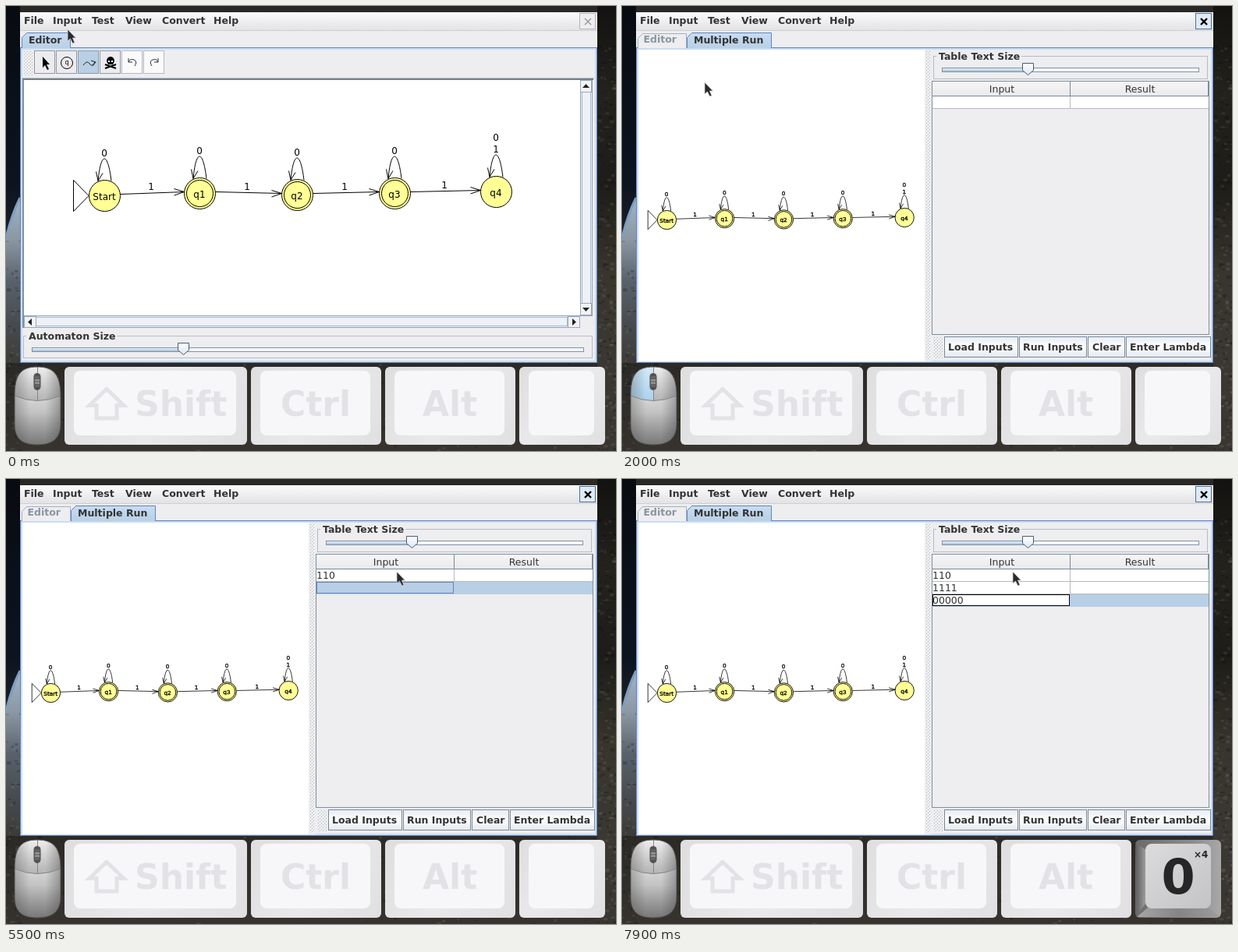
Animation of 782x571 px, one loop 8 s. Source, as an HTML page with a canvas:

```html
<!DOCTYPE html>
<html lang="en">
<head>
<meta charset="utf-8">
<title>Multiple run</title>
<style>
html, body { margin: 0; width: 782px; height: 571px; overflow: hidden; background: #26231f; }
canvas { display: block; }
</style>
</head>
<body>
<canvas id="stage" width="782" height="571"></canvas>
<script>
const g = document.getElementById('stage').getContext('2d');
const INK = '#333', PANEL = '#eeedef', EDGE = '#7a8a99', BLUE = '#b8cfe5', STEEL = '#6382bf';

// ---- timing: [ms, x, y] for the pointer, then what has been typed
const PATH = [[0, 79, 30], [100, 79, 30], [400, 77, 18], [1000, 77, 18], [1400, 105, 87], [1500, 105, 87],
  [1600, 106, 98], [2000, 106, 98], [2200, 480, 133], [2300, 480, 133], [2400, 482, 135],
  [2500, 482, 135], [2800, 512, 106], [3000, 501, 119]];
const PRESSES = [[400, 800], [1700, 2100], [3000, 3500]];
const DONE = ['110', '1111'];
// [ms, selected row, text in the cell, key shown, repeats]
const TYPING = [[0, -1, '', '', 0], [3500, 0, '', '', 0],
  [4100, 0, '1', '1', 1], [4200, 0, '11', '1', 2], [4700, 0, '110', '0', 1],
  [5200, 1, '', '⏎', 1], [5500, 1, '', '', 0],
  [5900, 1, '1', '1', 1], [6000, 1, '11', '1', 2], [6100, 1, '111', '1', 3], [6300, 1, '1111', '1', 4],
  [6600, 2, '', '⏎', 1], [6700, 2, '', '', 0],
  [7300, 2, '0', '0', 1], [7400, 2, '00', '0', 2], [7600, 2, '000', '0', 3],
  [7700, 2, '000', '0', 4], [7900, 2, '00000', '0', 4]];

function pointerAt(t) {
  const i = PATH.findIndex(p => p[0] > t);
  if (i < 0) return PATH.at(-1).slice(1);
  const [t0, x0, y0] = PATH[i - 1], [t1, x1, y1] = PATH[i], k = (t - t0) / (t1 - t0);
  return [Math.round(x0 + (x1 - x0) * k), Math.round(y0 + (y1 - y0) * k)];
}

// ---- drawing helpers
function rect(x, y, w, h, fill) { g.fillStyle = fill; g.fillRect(x, y, w, h); }
function frame(x, y, w, h, color = EDGE) {
  g.strokeStyle = color; g.lineWidth = 1;
  g.strokeRect(x + .5, y + .5, w - 1, h - 1);
}
function round(x, y, w, h, r, fill) {
  g.beginPath(); g.roundRect(x, y, w, h, r);
  g.fillStyle = fill; g.fill();
}
function fade(x0, y0, x1, y1, ...colors) {
  const f = g.createLinearGradient(x0, y0, x1, y1);
  colors.forEach((c, i) => f.addColorStop(i / (colors.length - 1), c));
  return f;
}
function font(size, bold) { g.font = `${bold ? 'bold ' : ''}${size}px "DejaVu Sans", sans-serif`; }
function text(s, x, y, { size = 12.5, color = INK, bold = false, align = 'left' } = {}) {
  font(size, bold);
  g.fillStyle = color; g.textAlign = align;
  g.fillText(s, x, y);
}
// bold text whose visible left edge sits at x
function label(s, x, y, color) {
  font(12.5, true); g.textAlign = 'left';
  text(s, x + Math.round(g.measureText(s).actualBoundingBoxLeft), y, { bold: true, color });
}
function shape(d, fill, stroke, width = 1) {
  const p = new Path2D(d);
  if (fill) { g.fillStyle = fill; g.fill(p); }
  if (stroke) { g.strokeStyle = stroke; g.lineWidth = width; g.stroke(p); }
}
function dots(x, y, w, h) {
  for (let r = 0; r < h; r += 2)
    for (let c = r % 4; c < w; c += 4) {
      rect(x + c, y + r, 1, 1, '#a3adb8');
      rect(x + c + 1, y + r + 1, 1, 1, '#fafafb');
    }
}

// ---- desktop, mouse and keys
function specks(n, x, y, w, h) {
  let seed = 7;
  const rnd = () => (seed = seed * 16807 % 2147483647) / 2147483647;
  for (let i = 0; i < n; i++)
    rect(x + rnd() * w, y + rnd() * h, 2 + rnd() * 4, 1 + rnd() * 3,
      rnd() < .5 ? 'rgba(0,0,0,.22)' : 'rgba(150,142,128,.16)');
}

function desktop() {
  rect(0, 0, 782, 571, fade(0, 458, 0, 571, '#2d2a26', '#37342f'));
  rect(18, 0, 740, 8, '#2a2826');
  rect(0, 0, 18, 571, fade(0, 0, 0, 571, '#080b10', '#0a1019', '#0c1420', '#2a2a29', '#2b2a27', '#35322d'));
  g.save();
  g.beginPath(); g.rect(0, 0, 18, 458); g.clip();
  shape('M18 246Q7 268 0 298V460H18Z', fade(0, 246, 0, 458, '#9fb4c8', '#8b98a4', '#59626c', '#484c50', '#3c3b38'));
  shape('M18 246Q7 268 0 298', null, '#7f9dc0', 3);
  g.restore();
  rect(758, 0, 24, 571, fade(0, 0, 0, 571, '#131210', '#24221d', '#1e1c18', '#38352d', '#3b3833', '#3a3732'));
  specks(220, 758, 50, 24, 521);
  specks(70, 0, 300, 18, 271);
  specks(160, 0, 458, 782, 113);
}

function mouse(pressed) {
  const body = 'M11 501C11 474 18 463 40 463S70 474 70 501V536C70 555 60 563 40 563S11 555 11 536Z';
  shape(body, fade(0, 500, 0, 563, '#d9d9d9', '#c3c3c3', '#9c9c9c', '#787878'));
  g.save(); g.clip(new Path2D(body));
  shape('M11 463H70V500Q40 513 11 500Z', fade(0, 463, 0, 508, '#eee', '#cfcfcf', '#b2b2b2'));
  if (pressed) shape('M11 463H40V507Q24 505 11 500Z', fade(0, 463, 0, 507, '#d3eafa', '#a9d2ee'));
  rect(11, 463, 59, 100, fade(11, 0, 70, 0, 'rgba(60,60,60,.3)', 'rgba(60,60,60,0)', 'rgba(60,60,60,0)', 'rgba(50,50,50,.35)'));
  shape('M11 500Q40 513 70 500M40.5 463V507', null, '#858585');
  g.restore();
  shape(body, null, '#4e4e4e');
  round(35.5, 471, 9, 22, 4.5, '#555');
  round(37, 473, 6, 18, 3, fade(0, 473, 0, 491, '#444', '#aaa', '#444'));
  shape('M37 478H43M37 482H43M37 486H43', null, '#444');
}

function paleKey(x, w, name, tx) {
  round(x, 463, w, 100, 6, fade(x, 463, x + w, 563, '#dededf', '#e9e8ea', '#e0dfe1'));
  round(x + 12, 468, w - 26, 83, 8, '#f7f6f9');
  text(name, tx, 526, { size: 44, bold: true, color: '#e3e2e6' });
}

function keys(key, count) {
  paleKey(75, 234, 'Shift', 165);
  shape('M129 491.5L151 512.5H142V529H116V512.5H107Z', null, '#e3e2e6', 5);
  paleKey(314, 167, 'Ctrl', 352);
  paleKey(486, 167, 'Alt', 534);
  if (!key) return paleKey(658, 110, '', 0);
  round(658, 463, 110, 100, 6, fade(658, 0, 768, 0, '#6a6a6a', '#7c7c7c', '#8c8c8c', '#a8a8a8'));
  shape('M658 468L671 475V545L660 561Z', fade(658, 0, 671, 0, '#5a5a5a', '#9c9c9c'));
  shape('M660 562L674 550H752L766 562Z', fade(658, 0, 768, 0, '#a8a8a8', '#858585', '#9c9c9c'));
  round(671, 468, 84, 83, 8, fade(671, 468, 755, 551, '#dcdcde', '#cfcfd1', '#c4c4c7'));
  text(key, 713, 532, { size: 62, bold: true, color: '#262626', align: 'center' });
  if (count > 1) text('×' + count, 733, 486, { size: 12, bold: true, color: '#262626' });
}

// ---- automaton
const STATES = [['Start', 126.5, 243.5], ['q1', 248.5, 240.5], ['q2', 373.5, 242.5], ['q3', 498.5, 240.5], ['q4', 628.5, 238.5]];
const EDGE_LABELS = [[186, 236], [309, 236], [434, 236], [562, 234]];

function automaton(small) {
  const mark = (s, x, y) => {
    text(s, x, y, { size: 12, color: '#000', align: 'center' });
    if (small) { g.strokeStyle = '#000'; g.lineWidth = .5; g.strokeText(s, x, y); }
  };
  const line = d => shape(d, null, '#000', small ? 1.3 : 1);
  const ring = (x, y, r, fill) =>
    shape(`M${x - r} ${y}a${r} ${r} 0 1 0 ${2 * r} 0a${r} ${r} 0 1 0 ${-2 * r} 0Z`, fill, '#000', small ? 1.5 : 1);
  g.save();
  if (small) { g.translate(-19.3, 126.7); g.scale(.607, .607); }
  line('M86.5 223.5L106 243.5L86.5 263.5Z');
  STATES.forEach(([name, x, y], i) => {
    const next = STATES[i + 1];
    line(`M${x + 8.5} ${y - 19}C${x + 4} ${y - 57} ${x - 5} ${y - 57} ${x - 8.5} ${y - 19}m-2.5 -12l2.5 12l6 -10`);
    mark('0', x - .5, y - (i === 4 ? 65.5 : 50.5));
    if (i === 4) mark('1', x - .5, y - 50.5);
    if (next) {
      line(`M${x + 20.5} ${y - 2}L${next[1] - 20} ${next[2] - 2}m-13 -4l13 4l-13 4.5`);
      mark('1', ...EDGE_LABELS[i]);
    }
    ring(x, y, 20, '#ffff96');
    if (i > 0 && i < 4) ring(x, y, 17);
    mark(name, x - .5, y + 5.5);
  });
  g.restore();
}

// ---- window parts
function titled(name, x, y, w, h) {
  frame(x, y, w, h, '#b4bcc5');
  font(12.5, true);
  rect(x + 4, y - 2, g.measureText(name).width + 5, 5, PANEL);
  label(name, x + 7, y + 5);
}
function slider(x, y, w, at) {
  rect(x, y, w, 6, '#f5f5f7');
  rect(x, y, at - x, 6, fade(0, y, 0, y + 6, '#fff', '#8fb1d5'));
  frame(x, y, w, 6, '#7f93a8');
  shape(`M${at - 6.5} ${y - 5.5}h14v9l-7 6l-7 -6Z`, fade(0, y - 5, 0, y + 9, '#fff', '#dbe6f2'), '#465b74');
}
function tab(name, x, w, active) {
  const y = active ? 34.5 : 35.5;
  shape(`M${x + .5} 54V${y + 6}L${x + 6.5} ${y}H${x + w - .5}V54`,
    active ? fade(0, 34, 0, 54, '#c8ddf2', BLUE) : PANEL, active ? STEEL : '#a3b1c0');
  label(name, x + (active ? 10 : 8.5), active ? 48 : 47, active ? INK : '#8995a2');
}
function button(x, y, w, h, name) {
  rect(x, y, w, h, fade(0, y, 0, y + h, '#e6edf5', '#fdfdfd', '#e3e8ee'));
  frame(x, y, w, h);
  label(name, x + 6, y + 18);
}

function chrome(run) {
  rect(18, 8, 740, 450, PANEL);
  rect(18, 8, 740, 23, fade(0, 8, 0, 31, '#fbfbfc', '#e3e2e5'));
  rect(18, 31, 740, 1, '#cfcfd2');
  for (const [s, x] of [['File', 24], ['Input', 61], ['Test', 110], ['View', 153], ['Convert', 200], ['Help', 267]]) label(s, x, 23);
  rect(735, 9, 21, 21, run ? '#dfeaf5' : '#eeedf0');
  frame(735, 9, 21, 21, run ? '#4f6f94' : '#b5b5b9');
  shape('M742 16L750 24M750 16L742 24', null, run ? '#000' : '#9a9a9e', run ? 2.4 : 1.5);
  frame(18, 53, 740, 405, STEEL);
  frame(19, 54, 738, 403, '#c8ddf2');
  frame(20, 55, 736, 401, '#c8ddf2');
}

function toolbar() {
  dots(23, 58, 11, 32);
  for (let i = 0; i < 6; i++) {
    const x = 36 + 28 * i;
    rect(x, 57, 27, 30, i === 2 ? BLUE : i > 3 ? '#fafafb' : '#ecebee');
    frame(x, 57, 27, 30, i > 3 ? '#b3bac2' : '#8d99a6');
  }
  shape('M47 65V79L50 76L53 82L55 81L52 75H56Z', '#000');
  g.strokeStyle = '#000'; g.lineWidth = 1;
  g.beginPath(); g.arc(78, 73, 7.5, 0, 7); g.stroke();
  text('q', 78, 75, { size: 8, color: '#000', align: 'center' });
  shape('M99 76Q104 69 107 74T114 72M109 70L115 72L111 77', null, '#222');
  shape('M129 71C129 63 139 63 139 71L137 75H131Z', '#000');
  shape('M127 75L141 80M141 75L127 80', null, '#000', 2);
  rect(131, 70, 2, 2, '#fff'); rect(135, 70, 2, 2, '#fff');
  shape('M157 72Q159 67 164 69T165 77M157 67V72H162', null, '#333');
  shape('M195 72Q193 67 188 69T187 77M195 67V72H190', null, '#333');
}

function scrollButton(x, y, w, h, arrow) {
  rect(x, y, w, h, '#f1f2f5');
  frame(x, y, w, h, '#9aa9b8');
  shape(arrow, '#222');
}

function editorPage() {
  tab('Editor', 20, 63, true);
  toolbar();
  rect(21, 92, 733, 1, '#b5bcc4');
  rect(21, 93, 732, 2, '#75818d');
  rect(21, 94, 2, 319, '#8290a0');
  rect(23, 95, 713, 303, '#fff');
  rect(736, 95, 16, 303, '#eef1f5');
  frame(736, 95, 16, 303, '#8fa3b9');
  frame(738, 110, 12, 272, '#a3bcd6');
  scrollButton(736, 95, 15, 16, 'M739 105L743.5 100L748 105Z');
  scrollButton(736, 381, 15, 16, 'M739 387L743.5 392L748 387Z');
  rect(23, 398, 713, 15, '#eef1f5');
  frame(23, 397, 713, 16, '#8fa3b9');
  frame(38, 399, 682, 12, '#a3bcd6');
  scrollButton(23, 398, 16, 15, 'M33 401L28 405.5L33 410Z');
  scrollButton(720, 398, 16, 15, 'M726 401L731 405.5L726 410Z');
  rect(736, 398, 16, 15, PANEL);
  automaton(false);
  titled('Automaton Size', 22, 423, 730, 29);
  slider(33, 438, 708, 227);
}

function menu(y) {
  rect(55, 9, 48, 22, '#a3b8cc');
  frame(55, 9, 48, 22, '#7f98b2');
  label('Input', 61, 23);
  rect(55, 30, 235, 81, PANEL);
  frame(55, 30, 235, 81, STEEL);
  const hot = y < 33 ? -1 : Math.floor((y - 33) / 19);
  [['Step with Closure...', 'Meta-R'], ['Step by State...', 'Meta+Shift-R'], ['Fast Run...', ''], ['Multiple Run', 'Meta-M']]
    .forEach(([name, keys], i) => {
      if (i === hot) { rect(56, 33 + 19 * i, 233, 19, '#a3b8cc'); rect(56, 33 + 19 * i, 233, 1, STEEL); }
      label(name, 62, 47 + 19 * i);
      text(keys, 207, 46 + 19 * i, { size: 10, color: i === hot ? INK : STEEL });
    });
}

function table(row, typed) {
  rect(398, 97, 354, 19, fade(0, 97, 0, 116, '#f6f5f7', '#e9e8eb'));
  frame(397, 96, 356, 326, '#7f8f9f');
  rect(398, 115, 354, 1, EDGE);
  rect(574, 97, 1, 19, EDGE);
  rect(751, 97, 1, 19, EDGE);
  text('Input', 487, 111, { align: 'center' });
  text('Result', 664, 111, { align: 'center' });
  for (let i = 0; i <= Math.max(row, 0); i++) {
    const y = 116 + 16 * i, chosen = i === row;
    rect(398, y, 354, 16, chosen ? BLUE : '#fff');
    if (!chosen) { rect(398, y + 15, 354, 1, '#b9b9be'); rect(574, y, 1, 16, '#b9b9be'); }
    else if (typed) { rect(398, y, 176, 15, '#fff'); frame(398, y, 176, 15, '#000'); }
    else frame(398, y, 176, 15, STEEL);
    text(chosen ? typed : i < row ? DONE[i] : '', 398, y + 12);
  }
}

function runPage(row, typed) {
  tab('Editor', 20, 63, false);
  tab('Multiple Run', 83, 109, true);
  rect(21, 56, 367, 400, '#fff');
  rect(388, 56, 9, 400, PANEL);
  dots(390, 58, 6, 396);
  automaton(true);
  titled('Table Text Size', 399, 64, 352, 30);
  slider(410, 79, 330, 520);
  table(row, typed);
  dots(400, 425, 11, 27);
  button(413, 424, 95, 27, 'Load Inputs');
  button(509, 424, 87, 27, 'Run Inputs');
  button(597, 424, 48, 27, 'Clear');
  button(646, 424, 109, 27, 'Enter Lambda');
}

function pointer(x, y, beam) {
  g.save(); g.translate(x, y);
  if (beam) {
    const d = 'M-4 -7.5Q0 -7.5 0 -5Q0 -7.5 4 -7.5M0 -5V5M-4 7.5Q0 7.5 0 5Q0 7.5 4 7.5';
    shape(d, null, '#fff', 2.5);
    shape(d, null, '#111', 1.2);
  } else shape('M0 0V15L3.5 12L6.5 18L9 17L6.5 11H10.5Z', '#2a2a2c', '#d5d5d8', .8);
  g.restore();
}

function draw(now) {
  const t = Math.floor(now % 8000 / 100) * 100;
  const [x, y] = pointerAt(t);
  const [, row, typed, key, count] = TYPING.findLast(s => s[0] <= t);
  const run = t >= 2000;
  desktop();
  chrome(run);
  if (run) runPage(row, typed);
  else {
    editorPage();
    if (t >= 500) menu(y);
  }
  mouse(PRESSES.some(([a, b]) => t >= a && t < b));
  keys(key, count);
  pointer(x, y, t >= 4100 && t < 5500);
}

const start = performance.now();
function tick() {
  draw(performance.now() - start);
  requestAnimationFrame(tick);
}
tick();
</script>
</body>
</html>
```
